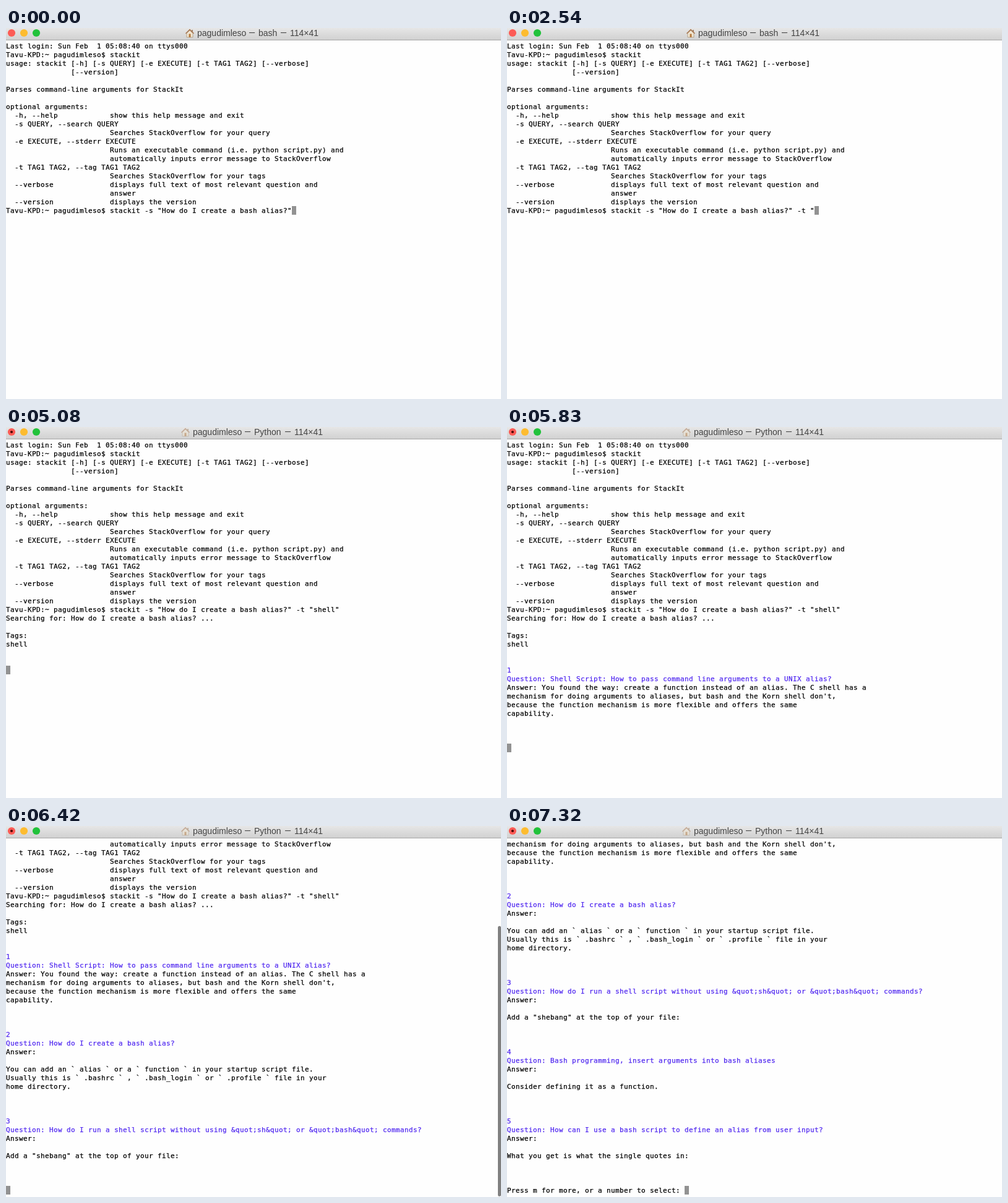
An HTML page that plays this animation: 800 by 600 pixels, repeating every 8 s.

```html
<!DOCTYPE html>
<html lang="en">
<head>
<meta charset="utf-8">
<title>Terminal</title>
<style>
  html, body { margin: 0; width: 100%; height: 100%; overflow: hidden; background: #fefefe; }
  svg { display: block; width: 800px; height: 600px; }
  .row { font: 11px "DejaVu Sans Mono", monospace; white-space: pre; fill: #000; stroke: #000; stroke-width: .25; }
  .row.hit { fill: #5028f0; stroke: #5028f0; }
  .title { font: 14px "Liberation Sans", Arial, sans-serif; fill: #444; }
  .dash { font-family: Roboto, sans-serif; }
</style>
</head>
<body>
<svg viewBox="0 0 800 600">
  <defs>
    <linearGradient id="bar" x2="0" y2="1">
      <stop offset="0" stop-color="#e6e6e6"/>
      <stop offset="1" stop-color="#d1d1d1"/>
    </linearGradient>
    <clipPath id="view"><rect y="20" width="800" height="580"/></clipPath>
  </defs>
  <rect width="800" height="600" fill="#fefefe"/>
  <g clip-path="url(#view)">
    <g id="screen"><rect id="cursor" width="7" height="14" fill="#929292"/></g>
  </g>
  <rect id="thumb" x="795" width="5" rx="2.5" fill="#808080"/>

  <rect width="800" height="19" fill="url(#bar)"/>
  <rect y="19" width="800" height="1" fill="#a6a6a6"/>
  <circle cx="9" cy="8" r="6.1" fill="#fc5b56"/>
  <circle cx="29" cy="8" r="6.1" fill="#fdbc30"/>
  <circle cx="49" cy="8" r="6.1" fill="#22c23b"/>
  <circle id="busy" cx="9" cy="8" r="2.1" fill="#4a0503"/>
  <g id="left">
    <g id="house">
      <path d="M292 8.5 297 3.5 302 8.5V15H292Z" fill="#f1e6d2" stroke="#a08c70" stroke-width=".7"/>
      <path d="M300 3h2v4h-2z" fill="#a58a70"/>
      <path d="M290.5 9 297 2.7 303.5 9" fill="none" stroke="#a87650" stroke-width="1.6"/>
      <path d="M295.5 9.5h3V15h-3z" fill="#b5793c"/>
    </g>
    <text class="title" x="309" y="13">pagudimleso</text>
    <text class="title dash" x="392" y="13">—</text>
    <text class="title" id="job" x="408" y="13">bash</text>
  </g>
  <g id="right">
    <text class="title dash" x="443" y="13">—</text>
    <text class="title" x="459" y="13">114×41</text>
  </g>
</svg>
<script>
const LOOP = 8000, CELL = 7, LINE = 14, TOP = 22, ROWS = 41;
const PROMPT = 'Tavu-KPD:~ pagudimleso$ ';
const COMMAND = PROMPT + 'stackit -s "How do I create a bash alias?"';
const TYPED = ' -t "shell"';
const KEYS = [1200, 1340, 1790, 2090, 2540, 3280, 3430, 3580, 3730, 3880, 4330];
const RUN = 4930;

// [time, row the cursor stands on]
const STEPS = [[0, 19], [RUN, 20], [5080, 26], [5830, 35], [6130, 45], [6420, 53], [6720, 61], [7020, 69]];

const lines = `Last login: Sun Feb  1 05:08:40 on ttys000
${PROMPT}stackit
usage: stackit [-h] [-s QUERY] [-e EXECUTE] [-t TAG1 TAG2] [--verbose]
               [--version]

Parses command-line arguments for StackIt

optional arguments:
  -h, --help            show this help message and exit
  -s QUERY, --search QUERY
                        Searches StackOverflow for your query
  -e EXECUTE, --stderr EXECUTE
                        Runs an executable command (i.e. python script.py) and
                        automatically inputs error message to StackOverflow
  -t TAG1 TAG2, --tag TAG1 TAG2
                        Searches StackOverflow for your tags
  --verbose             displays full text of most relevant question and
                        answer
  --version             displays the version
${COMMAND}
Searching for: How do I create a bash alias? ...

Tags:
shell


1
Question: Shell Script: How to pass command line arguments to a UNIX alias?
Answer: You found the way: create a function instead of an alias. The C shell has a
mechanism for doing arguments to aliases, but bash and the Korn shell don't,
because the function mechanism is more flexible and offers the same
capability.



2
Question: How do I create a bash alias?
Answer:

You can add an \` alias \` or a \` function \` in your startup script file.
Usually this is \` .bashrc \` , \` .bash_login \` or \` .profile \` file in your
home directory.



3
Question: How do I run a shell script without using &quot;sh&quot; or &quot;bash&quot; commands?
Answer:

Add a "shebang" at the top of your file:



4
Question: Bash programming, insert arguments into bash aliases
Answer:

Consider defining it as a function.



5
Question: How can I use a bash script to define an alias from user input?
Answer:

What you get is what the single quotes in:



Press m for more, or a number to select: `.split('\n');

const INPUT = 19, LAST = lines.length - 1;
const $ = id => document.getElementById(id);
const set = (el, attrs) => { for (const k in attrs) el.setAttribute(k, attrs[k]); };
const columns = Array.from({ length: 114 }, (_, i) => i * CELL).join(' ');

const rows = lines.map((line, i) => {
  const el = document.createElementNS('http://www.w3.org/2000/svg', 'text');
  set(el, { x: columns, y: TOP + i * LINE + 11, class: /^(\d$|Question)/.test(line) ? 'row hit' : 'row' });
  el.textContent = line;
  return $('screen').appendChild(el);
});

function draw(t) {
  const row = STEPS.filter(s => s[0] <= t).pop()[1];
  const scroll = Math.max(0, row - ROWS + 1);
  const input = COMMAND + TYPED.slice(0, KEYS.filter(k => k <= t).length);
  const running = t >= RUN;

  if (rows[INPUT].textContent !== input) rows[INPUT].textContent = input;
  rows.forEach((el, i) => {
    const shown = i >= scroll && (i < row || i === INPUT || (i === LAST && row === LAST));
    el.style.display = shown ? '' : 'none';
  });
  const col = row === INPUT ? input.length : row === LAST ? lines[LAST].length : 0;
  set($('cursor'), { x: col * CELL, y: TOP + row * LINE });
  set($('screen'), { transform: `translate(0 ${-scroll * LINE})` });

  const thumbTop = 23 + 576 * scroll / (ROWS + scroll);
  const fade = t < 6270 || t >= 7320 ? 0 : t < 7170 ? 1 : 0.5;
  set($('thumb'), { y: thumbTop, height: 599 - thumbTop, opacity: fade });

  const shift = running ? 7 : 0;
  set($('left'), { transform: `translate(${-shift} 0)` });
  set($('right'), { transform: `translate(${shift} 0)` });
  set($('house'), { opacity: running ? 0.5 : 1 });
  set($('busy'), { opacity: running ? 1 : 0 });
  $('job').textContent = running ? 'Python' : 'bash';
}

const start = performance.now();
function tick() {
  draw((performance.now() - start) % LOOP);
  requestAnimationFrame(tick);
}
tick();
</script>
</body>
</html>
```
